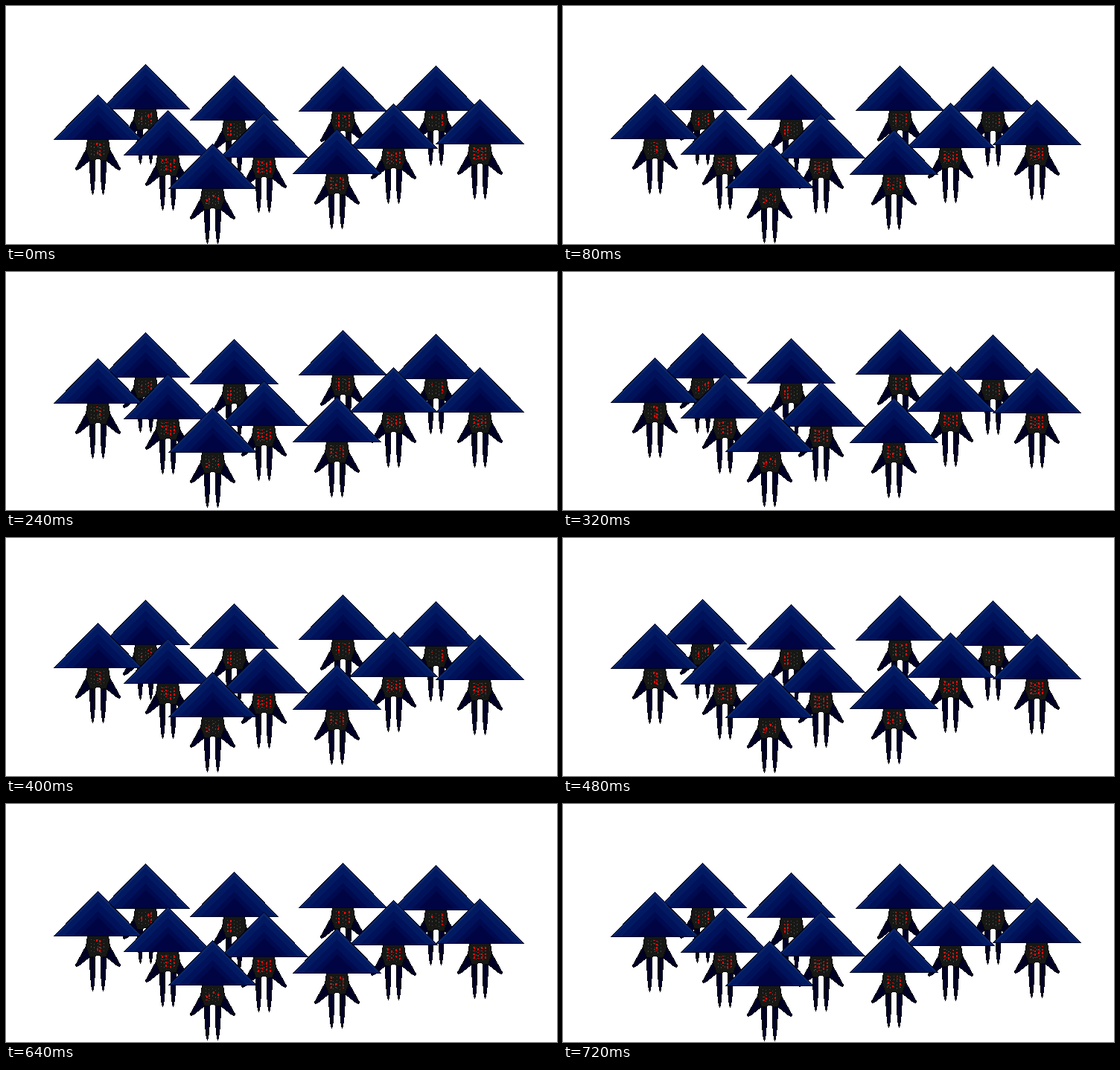
Write an HTML page without scripts that moves like this. It is 740x320 px and loops after 0.8 s.

```html
<!DOCTYPE html>
<html lang="en">
<head>
<meta charset="utf-8">
<title>Floating squad</title>
<style>
  html, body { margin: 0; width: 100%; height: 100%; overflow: hidden; background: #fff; }
  svg { display: block; width: 740px; height: 320px; shape-rendering: crispEdges; }

  .up, .down { animation: bob 800ms steps(5) -1ms infinite; }
  .up { --drift: -5px; }
  .down { --drift: 5px; }
  @keyframes bob { 50% { transform: translateY(var(--drift)); } }

  .led, .dim { fill: none; animation: blink 160ms step-end -1ms infinite; }
  .led { stroke: #f00808; stroke-width: 2; stroke-dasharray: 3 2 1 3 2 2; }
  .dim { stroke: #474a43; stroke-width: 1; stroke-dasharray: 1 3 2 4; }
  @keyframes blink { 50% { stroke-dashoffset: 5px; } }
</style>
</head>
<body>
<svg viewBox="0 0 740 320">
  <defs>
    <path id="limbs" d="M-14 70L-30 99L-29 101L-26 100L-11 88Z
      M-11 86Q-11 112 -8 132L-7 133.5L-6 132Q-3 110 -4 86Z"/>
    <g id="figure" stroke-linejoin="round">
      <g fill="#000026" stroke="#00000c">
        <use href="#limbs"/>
        <use href="#limbs" transform="scale(-1 1)"/>
      </g>
      <path d="M-14 60H14L16 74L11 88H4Q3 86 0 86Q-3 86 -4 88H-11L-16 74Z" fill="#171815" stroke="#080808"/>
      <path class="dim" d="M-9 64v16M-5 65v18M0 64v17M4 66v16M8 64v17"/>
      <path d="M0 0L59 60H-59Z" fill="#0a2468"/>
      <path d="M0 4L55 60H-55Z" fill="#021a62"/>
      <path d="M0 14L45 60H-45Z" fill="#00125a"/>
      <path d="M0 26L33 60H-33Z" fill="#000a4e"/>
      <path d="M0 35L25 60H-25Z" fill="#000442"/>
      <path d="M0 0L59 60H-59Z" fill="none" stroke="#00061e"/>
    </g>
  </defs>

  <g class="down"><g transform="translate(187.5 78.5)">
    <use href="#figure"/><path class="led" d="M-6 71v9M3 67v5M7 65v14"/>
  </g></g>
  <g class="down"><g transform="translate(577.5 80.5)">
    <use href="#figure"/><path class="led" d="M-6 67v4M8 65v15"/>
  </g></g>
  <g class="up"><g transform="translate(452.5 81.5)">
    <use href="#figure"/><path class="led" d="M-6 64v17M2 65v4M8 64v17"/>
  </g></g>
  <g class="up"><g transform="translate(306.5 93.5)">
    <use href="#figure"/><path class="led" d="M-9 69v13M-5 64v18"/>
  </g></g>
  <g class="up"><g transform="translate(123.5 119.5)">
    <use href="#figure"/><path class="led" d="M-2 64v5M2 65v16M-1 76v4"/>
  </g></g>
  <g class="down"><g transform="translate(636.5 125.5)">
    <use href="#figure"/><path class="led" d="M-8 64v16M-3 66v14M2 64v16M7 64v16"/>
  </g></g>
  <g class="up"><g transform="translate(520.5 131.5)">
    <use href="#figure"/><path class="led" d="M-8 64v14M-3 67v12M3 65v12M8 64v15"/>
  </g></g>
  <g class="up"><g transform="translate(217.5 140.5)">
    <use href="#figure"/><path class="led" d="M-8 65v7M-3 64v17M3 70v11M8 65v14"/>
  </g></g>
  <g class="down"><g transform="translate(346.5 143.5)">
    <use href="#figure"/><path class="led" d="M-8 64v16M-3 65v15M3 67v12M8 64v16"/>
  </g></g>
  <g class="down"><g transform="translate(444.5 165.5)">
    <use href="#figure"/><path class="led" d="M-8 64v16M-2 73v7M4 64v5M8 66v14"/>
  </g></g>
  <g class="up"><g transform="translate(277.5 185.5)">
    <use href="#figure"/><path class="led" d="M-8 74v7M-5 72v8M1 68v4M7 71v6"/>
  </g></g>
</svg>
</body>
</html>
```
